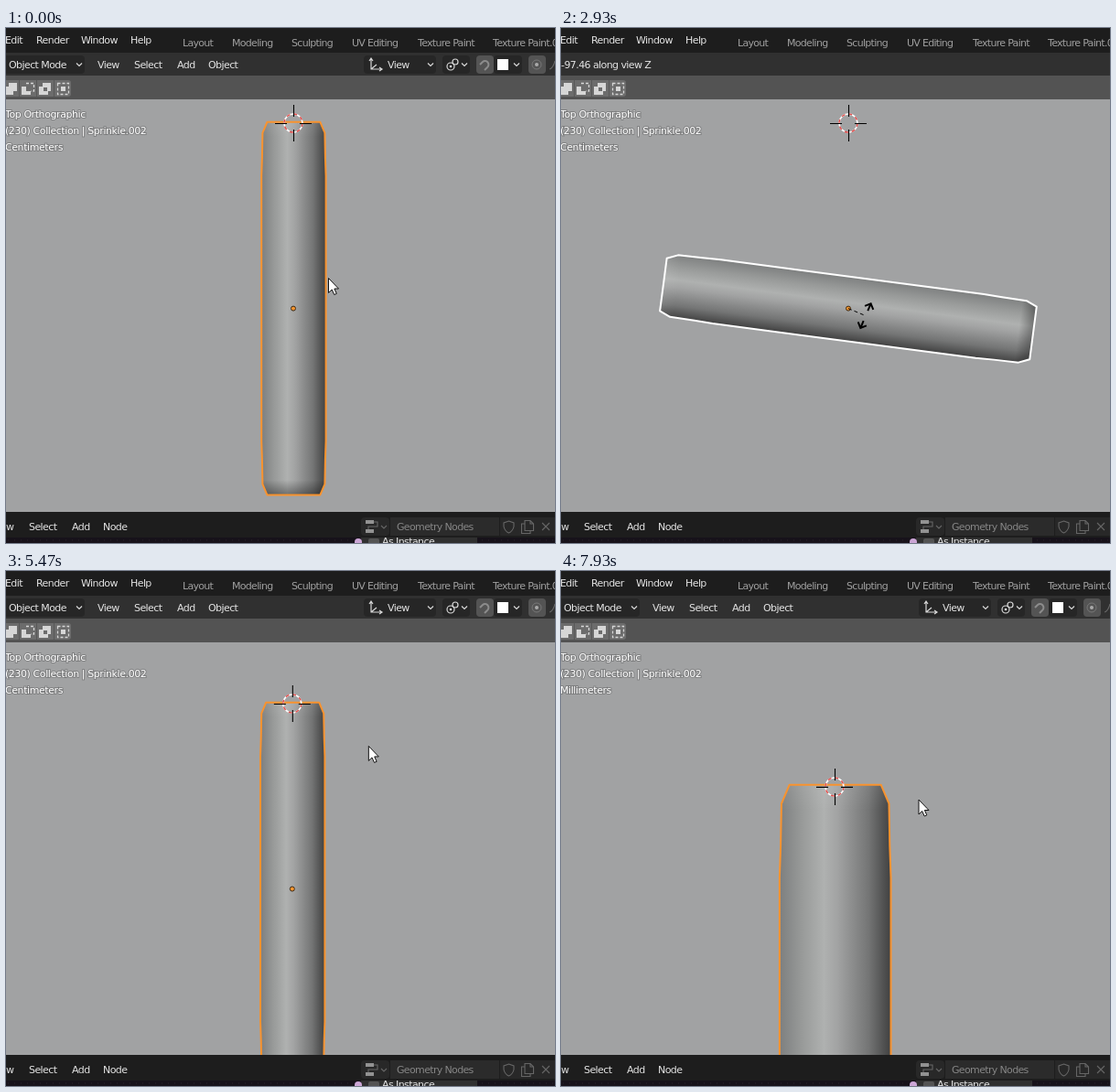
Recreate the animation shown at these times as an HTML page. Size 600x563 px, loop 8 s.

```html
<!DOCTYPE html>
<html lang="en">
<head>
<meta charset="utf-8">
<title>Rotate, pan and zoom</title>
<style>
html, body { margin: 0; width: 100%; height: 100%; overflow: hidden; background: #1d1d1d; }
svg { display: block; width: 600px; height: 563px; }
text { font: 11px "DejaVu Sans", sans-serif; letter-spacing: -.58px; fill: #e4e4e4; white-space: pre; }
.tab { fill: #a0a0a0; letter-spacing: -.7px; }
.dim { fill: #858585; letter-spacing: -.65px; }
.info text { fill: #fff; letter-spacing: -.42px; paint-order: stroke; stroke: #0003; stroke-width: 2px; }
.line { fill: none; stroke: #d8d8d8; stroke-width: 1.2; }
.faint { fill: none; stroke: #666; stroke-width: 1.1; }
</style>
</head>
<body>
<svg viewBox="0 0 600 563">
  <defs>
    <clipPath id="view"><rect y="78" width="600" height="451"/></clipPath>
    <linearGradient id="side">
      <stop offset="0" stop-color="#7d7f7f"/><stop offset=".2" stop-color="#989a99"/>
      <stop offset=".4" stop-color="#afb1b0"/><stop offset=".52" stop-color="#a2a3a3"/>
      <stop offset=".8" stop-color="#747575"/><stop offset="1" stop-color="#404040"/>
    </linearGradient>
    <linearGradient id="ends" gradientUnits="userSpaceOnUse" x1="0" x2="0" y1="-204" y2="204">
      <stop id="top" offset="0"/><stop id="topIn" offset=".04" stop-opacity="0"/>
      <stop id="endIn" offset=".96" stop-opacity="0"/><stop id="end" offset="1"/>
    </linearGradient>
    <path id="caret" class="line" d="M-3-1.5 0 1.5 3-1.5"/>
  </defs>

  <rect width="600" height="563" fill="#1d1d1d"/>
  <rect y="78" width="600" height="451" fill="#a1a2a3"/>

  <g clip-path="url(#view)">
    <g id="body">
      <path id="skin" fill="url(#side)"/>
      <path id="shade" fill="url(#ends)"/>
      <path id="rim" fill="none" stroke-width="2" stroke-linejoin="round" vector-effect="non-scaling-stroke"/>
    </g>
    <g id="cross" fill="none">
      <circle r="10" stroke="#fff" stroke-width="1.5"/>
      <circle r="10" stroke="#e0504e" stroke-width="1.5" stroke-dasharray="3.93"/>
      <path stroke="#000" stroke-width="1.1" d="M.5-20V-7M.5 7V20M-20 .5H-7M7 .5H20"/>
    </g>
    <circle id="dot" r="2.5" fill="#f7952f" stroke="#3a2a18"/>
    <g id="gizmo" fill="none" stroke="#000">
      <path id="spoke" stroke-dasharray="4 3"/>
      <path id="arrows" stroke-width="2" d="M0-6V-14M-5-9.500 0-14.500 5-9.500M0 6V14M-5 9.500 0 14.500 5 9.500"/>
    </g>
    <path id="mouse" d="M.5.5V16.500L4.200 13 6.700 18.500 9.300 17.400 6.900 12H11.500Z" fill="#fff" stroke="#111"/>
    <g class="info">
      <text x="-1" y="98">Top Orthographic</text>
      <text x="-1" y="116">(230) Collection | Sprinkle.002</text>
      <text id="unit" x="-1" y="134"></text>
    </g>
  </g>

  <g id="menu"></g>
  <rect y="27" width="600" height="25" fill="#303030"/>
  <text id="angle" x="0" y="44"></text>
  <g id="header">
    <rect x="-6" y="30" width="92" height="20" rx="4" fill="#262626"/>
    <use href="#caret" x="80" y="40"/>
    <rect x="391" y="30" width="79" height="20" rx="4" fill="#262626"/>
    <path class="line" d="M399 34V45H410M399 45 405 40M397 36 399 33 401 36M408 43 411 45 408 47"/>
    <use href="#caret" x="464" y="40"/>
    <rect x="477" y="30" width="30" height="20" rx="4" fill="#262626"/>
    <circle class="line" cx="486" cy="42" r="4"/><circle class="line" cx="491" cy="37" r="3"/>
    <circle cx="486" cy="42" r="1.300" fill="#ddd"/>
    <use href="#caret" x="501" y="40"/>
    <rect x="514" y="30" width="19" height="20" rx="4" fill="#545454"/>
    <path d="M518 40 521 37A3.800 3.800 0 0 1 526 43L523 46" fill="none" stroke="#8c8c8c" stroke-width="2"/>
    <rect x="533" y="30" width="31" height="20" rx="4" fill="#262626"/>
    <rect x="537" y="34" width="12" height="12" fill="#fff"/>
    <use href="#caret" x="558" y="40"/>
    <rect x="571" y="30" width="19" height="20" rx="4" fill="#545454"/>
    <circle cx="580" cy="40" r="5" fill="none" stroke="#777"/><circle cx="580" cy="40" r="2" fill="#aaa"/>
    <path class="faint" d="M594 45Q598 44 600 36"/>
  </g>

  <rect y="52" width="600" height="26" fill="#535353"/>
  <rect x="-4" y="57" width="75" height="18" rx="3" fill="#6c6c6c"/>
  <path d="M14.500 57V75M33.500 57V75M52.500 57V75" stroke="#585858"/>
  <g fill="#d6d6d6">
    <path d="M3 60H12V69H8V73H-2V64H3Z"/>
    <path d="M17 64H22V69H27V73H17Z"/>
    <path d="M40 60H49V69H46V73H36V64H40ZM41 65V69H45V65Z" fill-rule="evenodd"/>
    <path d="M60 64H65V69H60Z"/>
  </g>
  <g fill="none" stroke="#d6d6d6" stroke-width="1.300" stroke-dasharray="3 2">
    <path d="M22 60.500H30.500V69H27"/><path d="M56.500 60.500H68.500V72.500H56.500Z"/>
  </g>

  <rect y="557" width="600" height="6" fill="#17121a"/>
  <path d="M2 560H380M520 560H600" stroke="#2a222d" stroke-dasharray="1 6"/>
  <rect x="388" y="557" width="127" height="6" fill="#303030"/>
  <rect x="396" y="558" width="12" height="8" rx="2" fill="#545454"/>
  <circle cx="385" cy="562" r="4" fill="#cca6d6"/>
  <text x="411" y="565">As Instance</text>
  <rect y="529" width="600" height="28" fill="#1d1d1d"/>
  <rect x="388" y="535" width="31" height="20" rx="4" fill="#282828"/>
  <path d="M393 538H402V542H393ZM393 548H402V552H393Z" fill="#929292"/>
  <path class="faint" d="M402 540H406V545H396V548M410 544 413 547 416 544"/>
  <rect x="420" y="535" width="119" height="20" fill="#2b2b2b"/>
  <rect x="540" y="535" width="64" height="20" fill="#282828"/>
  <g class="faint">
    <path d="M549.500 539 555 541V545Q554 550 549.500 552 545 550 544 545V541Z"/>
    <path d="M567 538.500H573L576.500 542V549.500H567ZM567 542H563.500V552.500H573V549.500M573 538.500V542H576.500"/>
    <path d="M586 541 594 549M594 541 586 549"/>
  </g>
  <g id="footer"></g>
</svg>
<script>
const $ = id => document.getElementById(id);
const set = (id, attrs) => { for (const k in attrs) $(id).setAttribute(k, attrs[k]); };
const show = (id, on) => set(id, { visibility: on ? 'visible' : 'hidden' });

function labels(id, y, cls, items) {
  for (const [str, x] of Object.entries(items)) {
    const el = document.createElementNS('http://www.w3.org/2000/svg', 'text');
    el.textContent = str;
    el.setAttribute('x', x);
    el.setAttribute('y', y);
    el.setAttribute('class', cls);
    $(id).append(el);
  }
}
labels('menu', 17, '', { Edit: -1, Render: 33, Window: 82, Help: 136 });
labels('menu', 20, 'tab', { Layout: 193, Modeling: 247, Sculpting: 312,
  'UV Editing': 378, 'Texture Paint': 450, 'Texture Paint.001': 532 });
labels('header', 44, '', { 'Object Mode': 3, View: 100, Select: 140, Add: 187, Object: 221, 'View ': 417 });
labels('footer', 549, '', { w: 0, Select: 25, Add: 72, Node: 106 });
labels('footer', 549, 'dim', { 'Geometry Nodes': 427 });

// One quarter of the capsule, mirrored both ways
const corner = [[29, 203.8], [34, 192], [34.5, 165], [35.2, 145]];
const flip = (sx, sy) => corner.map(([x, y]) => [x * sx + .4, y * sy]);
const outline = 'M' + [...flip(1, -1), ...flip(1, 1).reverse(),
  ...flip(-1, 1), ...flip(-1, -1).reverse()].join('L') + 'Z';
for (const id of ['skin', 'shade', 'rim']) set(id, { d: outline });

// Time runs in steps, 15 per second
const FPS = 15, STEPS = 120, ARM = 202.6;
const wheel = [96, 97, 99];
const pivot = { x: 368, y: 250 };
const rad = deg => deg * Math.PI / 180;

function ramp(step, from, to) {
  const k = Math.min(1, Math.max(0, (step - from) / (to - from)));
  return k * k * (3 - 2 * k);
}

// Strokes: from, to, dx, dy. Drags carry the view along with the pointer.
const firstDrag = [[79, 86, -3, 104]];
const lateDrags = [[105, 108, -109, -29], [108, 111.4, 130, 39.5], [112, 115, 8.5, 48]];
const glides = [[0, 6, -27, 1], [60, 61, -8, 4], [69, 78, 80, -128], [89, 93, -26, -4],
  [102, 105, 69, 40], [115, 119, -76, -99]];

function follow(strokes, step, x, y) {
  for (const [from, to, dx, dy] of strokes) {
    const k = ramp(step, from, to);
    x += dx * k;
    y += dy * k;
  }
  return { x, y };
}

function shadeEnd(id, light) {
  const color = light > 0 ? '#fff' : '#000';
  set(id, { 'stop-color': color, 'stop-opacity': light > 0 ? light * .1 : -light * .5 });
  set(id + 'In', { 'stop-color': color });
}

function drawGizmo(x, y, turn, step) {
  const dir = turn - 74.5;
  const len = 33 - 12.4 * ramp(step, 38, 44) + 8.4 * ramp(step, 45, 58);
  const gx = x + len * Math.cos(rad(dir)), gy = y + len * Math.sin(rad(dir));
  set('spoke', { d: `M${x} ${y}L${gx} ${gy}` });
  set('arrows', { transform: `translate(${gx} ${gy}) rotate(${dir})` });
}

function render(step) {
  const rotating = step >= 23 && step < 61, active = step >= 25 && step < 61;
  const turn = rotating ? .4 * ramp(step, 31, 34) + 97.06 * ramp(step, 38, 44)
    - 75.46 * ramp(step, 45, 51) - 35 * ramp(step, 51, 58) : 0;

  // Wheel clicks zoom about the pointer
  const zoom = 1.2 ** wheel.filter(s => step >= s).length;
  const panned = follow(firstDrag, step, 314, 104);
  const { x, y } = follow(lateDrags, step,
    pivot.x + (panned.x - pivot.x) * zoom, pivot.y + (panned.y - pivot.y) * zoom);
  const oy = y + ARM * zoom;
  const mouse = follow([...glides, ...firstDrag, ...lateDrags], step, 352, 273);

  set('body', { transform: `translate(${x} ${oy}) rotate(${turn}) scale(${zoom})` });
  set('rim', { stroke: active ? '#fff' : '#f8932f' });
  const lit = .75 * Math.cos(rad(turn)) - .6 * Math.sin(rad(turn));
  shadeEnd('top', lit);
  shadeEnd('end', -lit);
  set('cross', { transform: `translate(${x} ${y})` });
  set('dot', { cx: x, cy: oy });

  drawGizmo(x, oy, turn, step);
  show('gizmo', rotating);
  show('mouse', step < 22 || step >= 61);
  set('mouse', { transform: `translate(${mouse.x} ${mouse.y})` });

  show('header', !active);
  show('angle', active);
  $('angle').textContent = (0 - turn).toFixed(2) + ' along view Z';
  $('unit').textContent = zoom > 1 ? 'Millimeters' : 'Centimeters';
}

const start = performance.now();
function tick() {
  const ms = performance.now() - start;
  render(Math.floor((ms + 4) * FPS / 1000) % STEPS);
  requestAnimationFrame(tick);
}
tick();
</script>
</body>
</html>
```
